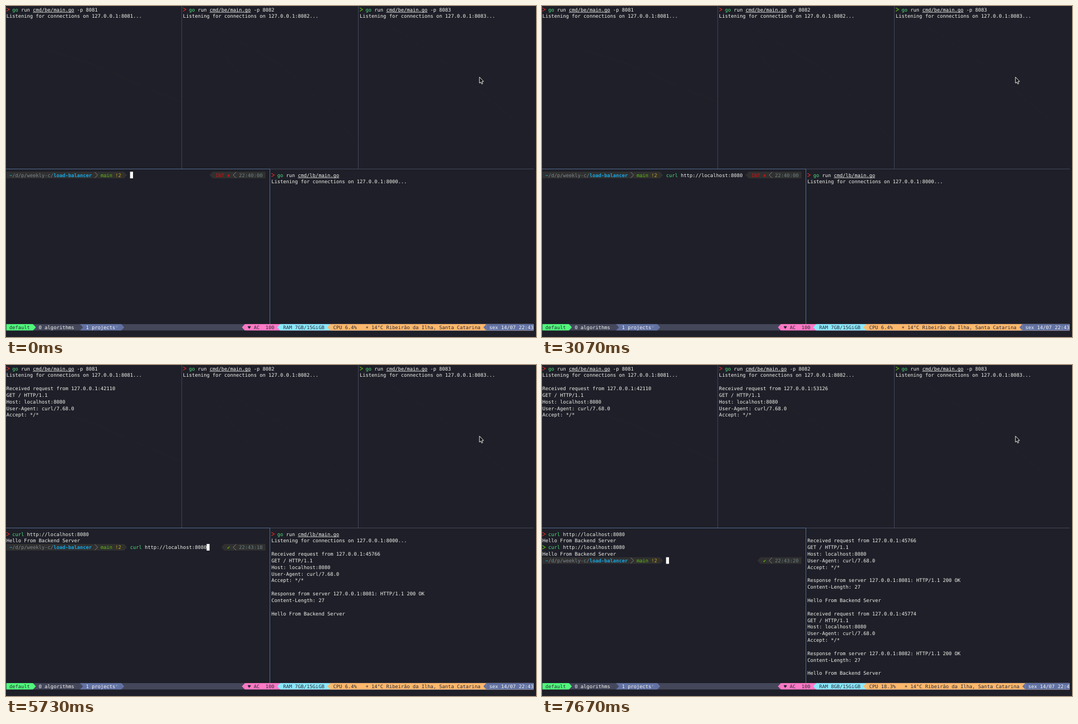
These frames come from a looping animation (947x592 px, 8000 ms). An HTML page with a canvas:

```html
<!DOCTYPE html>
<html>
<head>
<meta charset="utf-8">
<title>Load balancer terminal</title>
<style>
html, body { margin: 0; width: 100%; height: 100%; overflow: hidden; background: #1e1f28; }
canvas { display: block; width: 947px; height: 592px; }
</style>
</head>
<body>
<canvas id="stage" width="947" height="592"></canvas>
<script>
const ctx = document.getElementById('stage').getContext('2d');
const LOOP = 8000, CW = 947 / 180, CH = 592 / 50;
const FONT = '8.74px "DejaVu Sans Mono", "DejaVu Sans", monospace';
const BG = '#1e1f28', FG = '#f4f4ee', GREEN = '#4fe07c', RED = '#d42a22', LIME = '#59b40c',
  DARK = '#282a36', BAR = '#44475a', SLATE = '#6272a4', CHIP = '#303030', GHOST = '#4b4d56';
const URL_TEXT = 'http://localhost:8080', COMMAND = 'curl ' + URL_TEXT;
const HIDDEN = [[400, 1000], [2270, 2470], [3070, 3670], [4670, 5330], [7070, 7670]];
const KEYS = [1270, 1400, 1530, 1670];
const ACCEPT = 2470;

const X = col => 0.7 + col * CW;
const Y = row => 0.4 + row * CH;

// Terminal text: one glyph per cell
function text(col, row, str, color = FG, bold = false) {
  ctx.font = (bold ? 'bold ' : '') + FONT;
  ctx.fillStyle = color;
  [...str].forEach((ch, i) => ctx.fillText(ch, X(col + i), Y(row) + 9.2));
}

function cells(col, row, count, color) {
  ctx.fillStyle = color;
  ctx.fillRect(X(col), Y(row), count * CW, CH);
}

function path(points, color, stroke) {
  ctx.beginPath();
  points.forEach(([x, y]) => ctx.lineTo(x, y));
  if (stroke) {
    ctx.strokeStyle = color;
    ctx.lineWidth = stroke;
    ctx.stroke();
  } else {
    ctx.fillStyle = color;
    ctx.fill();
  }
}

// Triangle or chevron one cell wide; dir 1 points right, -1 left
function arrow(col, row, dir, color, stroke, inset = 0) {
  const base = X(dir > 0 ? col : col + 1), top = Y(row) + inset;
  path([[base, top], [base + dir * CW, Y(row) + CH / 2], [base, Y(row) + CH - inset]], color, stroke);
}

function line(x, y, w, h, color) {
  ctx.fillStyle = color;
  ctx.fillRect(x, y, w, h);
}

const mark = (col, row, color) => arrow(col, row, 1, color, 1.2, 2.8);

function goRun(col, row, file, args, color) {
  mark(col, row, color);
  text(col + 2, row, 'go', GREEN);
  text(col + 5, row, 'run');
  text(col + 9, row, file);
  line(X(col + 9), Y(row) + 10.4, file.length * CW, 0.8, FG);
  text(col + 10 + file.length, row, args);
}

const request = port => ['Received request from 127.0.0.1:' + port, 'GET / HTTP/1.1',
  'Host: localhost:8080', 'User-Agent: curl/7.68.0', 'Accept: */*'];

const exchange = (port, server) => ['', ...request(port), '',
  `Response from server 127.0.0.1:${server}: HTTP/1.1 200 OK`, 'Content-Length: 27', '',
  'Hello From Backend Server'];

function backend(index, port) {
  const col = index * 60, own = 8081 + index;
  goRun(col, 0, 'cmd/be/main.go', '-p ' + own, index < 2 ? RED : LIME);
  text(col, 1, `Listening for connections on 127.0.0.1:${own}...`);
  if (port) request(port).forEach((str, i) => text(col, 3 + i, str));
}

function balancer(t) {
  const scroll = t >= 6530 ? 2 : 0;
  const lines = ['', 'Listening for connections on 127.0.0.1:8000...'];
  if (t >= 4200) lines.push(...exchange(45766, 8081));
  if (t >= 6530) lines.push(...exchange(45774, 8082));
  if (!scroll) goRun(90, 25, 'cmd/lb/main.go', '', RED);
  lines.slice(scroll).forEach((str, i) => text(90, 25 + i, str));
}

function prompt(row, time, failed) {
  cells(0, row, 40, CHIP);
  arrow(40, row, 1, CHIP);
  text(1, row, '~', '#14a0dc', true);
  text(2, row, '/d/p/weekly-c/', '#7d858f');
  text(16, row, 'load-balancer', '#14a8e8', true);
  arrow(30, row, 1, '#949494', 0.8, 0.8);
  text(32, row, 'main', '#5cc010');
  text(37, row, '!2', '#c9a312');

  const left = failed ? 70 : 74;
  arrow(left - 1, row, -1, CHIP);
  cells(left, row, 88 - left, CHIP);
  if (failed) text(71, row, 'INT', '#c81414');
  text(75, row, failed ? '✘' : '✔', failed ? '#c81414' : LIME);
  arrow(77, row, -1, '#949494', 0.8, 0.8);
  text(79, row, time, '#6d8284');
}

function command(col, row) {
  text(col, row, 'curl', GREEN);
  text(col + 5, row, URL_TEXT);
}

function client(t) {
  let cursor = [42, 25], color = '#fff';

  if (t < 4130) {
    prompt(25, '22:40:00', true);
    const typed = KEYS.filter(k => t >= k).length;
    if (t >= ACCEPT) {
      command(42, 25);
      cursor[0] += COMMAND.length;
    } else if (typed) {
      text(42, 25, COMMAND, GHOST);
      cells(42, 25, typed, BG);
      text(42, 25, COMMAND.slice(0, typed), GREEN);
      cursor[0] += typed;
      color = '#555a70';
    }
  } else {
    mark(0, 25, RED);
    command(2, 25);
    cursor = [0, 26];
    if (t >= 4200) {
      text(0, 26, 'Hello From Backend Server');
      cursor = [0, 27];
    }
    if (t >= 4270 && t < 6530) {
      prompt(27, '22:43:18');
      cursor = [42, 27];
      if (t >= 5730) {
        command(42, 27);
        cursor[0] += COMMAND.length;
      }
    }
    if (t >= 6530) {
      mark(0, 27, LIME);
      command(2, 27);
      text(0, 28, 'Hello From Backend Server');
      cursor = [0, 29];
    }
    if (t >= 6600) {
      prompt(29, '22:43:20');
      cursor = [42, 29];
    }
  }
  if (!HIDDEN.some(([from, to]) => t >= from && t < to)) {
    cells(...cursor, 1, color);
    if (color !== '#fff') text(...cursor, COMMAND[cursor[0] - 42], BG);
  }
}

function statusBar(t) {
  const row = 48, busy = t >= 5930, shift = busy ? 1 : 0;
  ctx.save();
  ctx.beginPath();
  ctx.rect(0, Y(row), X(179), CH);
  ctx.clip();
  cells(0, row, 180, BAR);

  cells(0, row, 9, '#50fa7b');
  arrow(9, row, 1, '#50fa7b');
  text(1, row, 'default', DARK);
  text(11, row, '0 algorithms');
  text(23, row, '-', '#5c6072');
  cells(25, row, 14, SLATE);
  arrow(25, row, 1, BAR);
  arrow(39, row, 1, SLATE);
  text(27, row, '1 projects');
  text(37, row, '*', '#929dc0');

  [[81, '#ff79c6'], [93, '#8be9fd'], [110, '#ffb86c'], [163 + shift, SLATE]].forEach(([col, color]) => {
    arrow(col - 1, row, -1, color);
    cells(col, row, 180 - col, color);
  });
  text(82, row, '♥', DARK);
  text(84, row, 'AC  100', DARK);
  text(94, row, `RAM ${busy ? 8 : 7}GB/15GiGB`, DARK);
  text(111, row, `CPU ${busy ? '18.3' : '6.4'}%`, DARK);
  text(122 + shift, row, '☀', DARK);
  text(124 + shift, row, '14°C Ribeirão da Ilha, Santa Catarina', DARK);
  text(164 + shift, row, 'sex 14/07 22:43');
  ctx.restore();
}

// Barely visible wallpaper ridges behind the upper panes
function wallpaper() {
  [
    [[50, 70], [160, 106], [250, 146], [313, 172]],
    [[370, 33], [420, 65], [490, 104], [560, 168], [625, 240]],
    [[370, 55], [400, 100], [440, 150]],
    [[685, 35], [740, 70], [800, 112], [870, 172], [940, 232]]
  ].forEach(ridge => path(ridge, '#22232a', 1));
}

function pointer() {
  const shape = [[846, 127], [846, 138], [848.4, 136], [850, 139.6], [851.8, 138.8],
    [850.3, 135.2], [853.4, 135], [846, 127]];
  path(shape, '#111');
  path(shape, '#eee', 1);
}

function draw(now) {
  const t = now % LOOP;
  ctx.textRendering = 'geometricPrecision';
  line(0, 0, 947, 592, BG);
  wallpaper();

  line(313.5, 0, 1, 291, BAR);
  line(629, 0, 1, 291, BAR);
  line(472, 291, 471, 1, BAR);
  line(0, 291, 472, 1, '#536a90');
  line(471, 291, 1, 278, '#536a90');

  backend(0, t >= 4200 && 42110);
  backend(1, t >= 6530 && 53126);
  backend(2);
  client(t);
  balancer(t);
  statusBar(t);
  pointer();
}

const start = performance.now();
function tick() {
  draw(performance.now() - start);
  requestAnimationFrame(tick);
}
tick();
</script>
</body>
</html>
```
